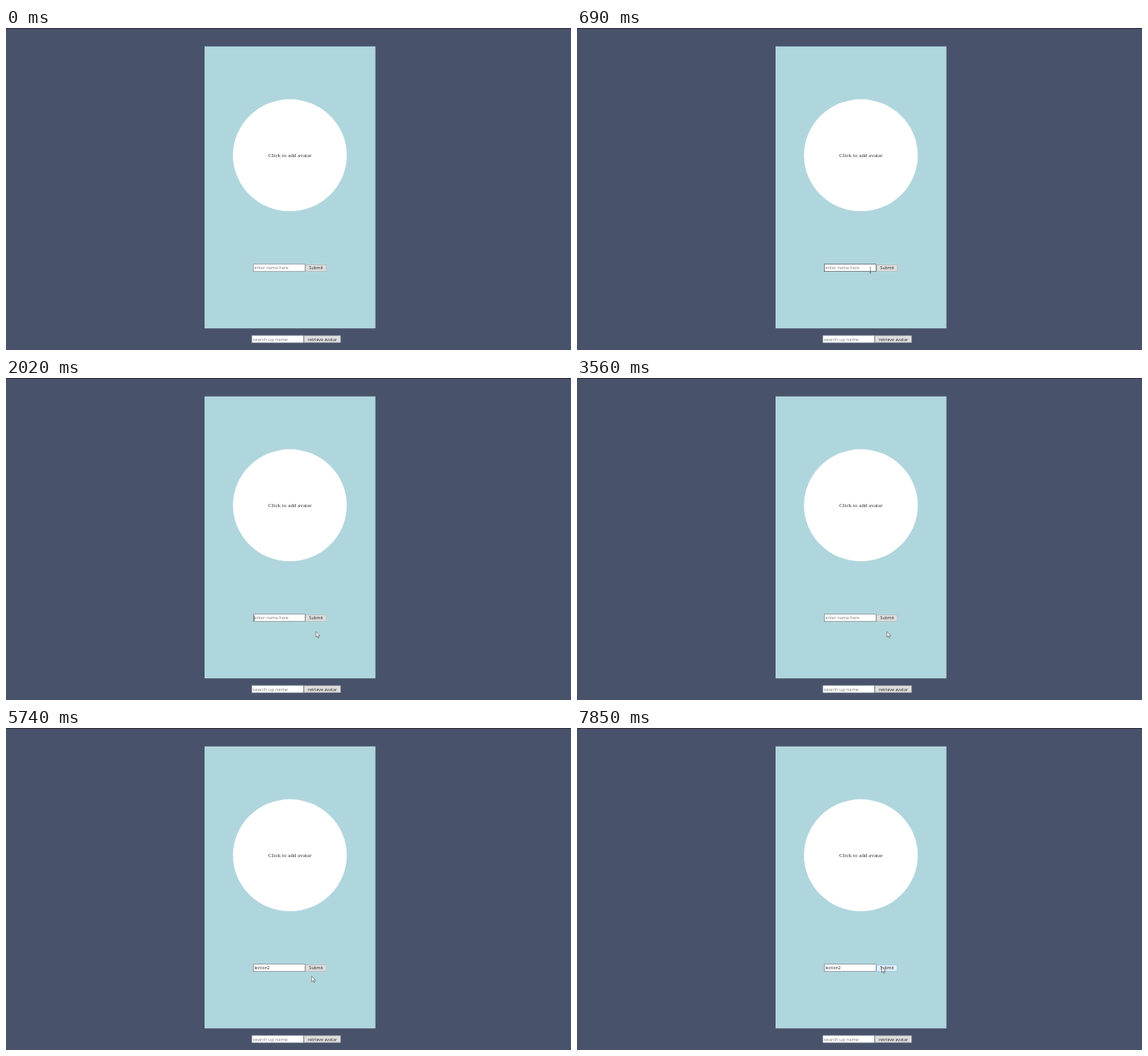
These frames come from a looping animation (700x399 px, 8000 ms). An HTML page:

```html
<!DOCTYPE html>
<html lang="en">
<head>
<meta charset="utf-8">
<title>Avatar form</title>
<style>
html, body { margin: 0; width: 100%; height: 100%; overflow: hidden; background: #49526b; }
svg { display: block; width: 100vw; height: 100vh; }
text { font-family: "Noto Sans", "Open Sans", sans-serif; font-size: 5.2px; fill: #333; white-space: pre; }
.hint { fill: #868686; font-size: 5.4px; }
.field { fill: #fff; stroke: #87949b; stroke-width: .7; }
.button { fill: #dedede; stroke: #b2b4b6; stroke-width: .6; }
.mid { text-anchor: middle; }
.serif { font-family: "Liberation Serif", serif; font-size: 7.06px; }
</style>
</head>
<body>
<svg viewBox="0 0 700 399" preserveAspectRatio="none">
  <rect width="700" height="399" fill="#49526b"/>
  <rect width="700" height="1" fill="#2d2e35"/>
  <rect x="246" y="22.8" width="211.7" height="349.4" fill="#b0d6dd"/>
  <ellipse cx="351.7" cy="157.7" rx="70.5" ry="69.4" fill="#fff"/>
  <text class="serif mid" x="351.8" y="160">Click to add avatar</text>

  <rect id="nameField" class="field" x="306.4" y="292.7" width="64" height="9"/>
  <text id="nameHint" class="hint" x="307.5" y="299.3">enter name here</text>
  <text id="typed" x="307.5" y="299.3"></text>
  <rect id="caret" y="294" width=".6" height="7" fill="#222"/>
  <rect id="submit" class="button" x="371.2" y="293.4" width="25.6" height="8"/>
  <text class="mid" x="384.2" y="299.3">Submit</text>

  <rect class="field" x="304.7" y="381" width="64" height="9"/>
  <text class="hint" x="305.8" y="387.7" style="font-size:5.75px">search up name</text>
  <rect class="button" x="369.3" y="381.2" width="45" height="8.6"/>
  <text class="mid" x="392" y="387.7" style="font-size:5.3px">retrieve avatar</text>

  <path id="arrow" d="M0 0V6.8L1.6 5.4L2.7 8L3.8 7.5L2.7 5H4.9Z" fill="#fff" stroke="#333" stroke-width=".5"/>
  <path id="beam" d="M-1 -3.4H1M0 -3.4V3.4M-1 3.4H1" fill="none" stroke="#444" stroke-width=".5"/>
</svg>
<script>
const LOOP = 8000, WORD = "lection2";
const el = id => document.getElementById(id);
const [nameField, nameHint, typed, caret, submit, arrow, beam] =
  ["nameField", "nameHint", "typed", "caret", "submit", "arrow", "beam"].map(el);

// Pointer moves: start, number of steps, end x, end y
const moves = [
  [70, 1, 565, 389.5],
  [140, 2, 396.5, 331.7],
  [450, 4, 363.5, 300.2],
  [920, 6, 384, 314.3],
  [5590, 3, 376, 304.3],
  [5820, 3, 377.5, 296]
];
const STEP = 78;
// Time, number of letters shown
const keys = [[4100, 2], [4260, 3], [4340, 4], [4660, 5], [4970, 6], [5110, 7], [5350, 8]];
// Caret toggles, first one on
const blinks = [840, 1470, 2020, 2560, 3100, 3560, 4100, 5670, 6210, 6770, 7310, 7850];

function pointerAt(t) {
  if (t < moves[0][0]) return null;
  let x = moves[0][2], y = moves[0][3];
  for (const [start, steps, endX, endY] of moves) {
    if (t < start) break;
    const p = Math.min(1, (Math.floor((t - start) / STEP) + 1) / steps);
    x += (endX - x) * p;
    y += (endY - y) * p;
  }
  return { x, y };
}

function inside(p, box) {
  const [x, y, w, h] = ["x", "y", "width", "height"].map(k => +box.getAttribute(k));
  return !!p && p.x >= x && p.x <= x + w && p.y >= y && p.y <= y + h;
}

function show(node, on) {
  node.style.display = on ? "" : "none";
}

function draw(t) {
  const p = pointerAt(t);
  const overField = inside(p, nameField), overSubmit = inside(p, submit);
  show(arrow, p && !overField);
  show(beam, overField);
  if (p) for (const node of [arrow, beam])
    node.setAttribute("transform", `translate(${p.x} ${p.y})`);

  nameField.style.stroke = overField ? "#4d5a62" : t >= 840 ? "#7d868b" : "";
  submit.style.fill = overSubmit ? "#e2eff8" : "";
  submit.style.stroke = overSubmit ? "#8dbfe0" : "";

  const count = keys.reduce((n, [at, letters]) => t >= at ? letters : n, 0);
  typed.textContent = WORD.slice(0, count);
  show(nameHint, !count);
  caret.setAttribute("x", 307.4 + (count ? typed.getComputedTextLength() : 0));
  show(caret, blinks.filter(at => t >= at).length % 2);
}

const begin = performance.now();
function frame() {
  draw((performance.now() - begin) % LOOP);
  requestAnimationFrame(frame);
}
draw(0);
requestAnimationFrame(frame);
</script>
</body>
</html>
```
